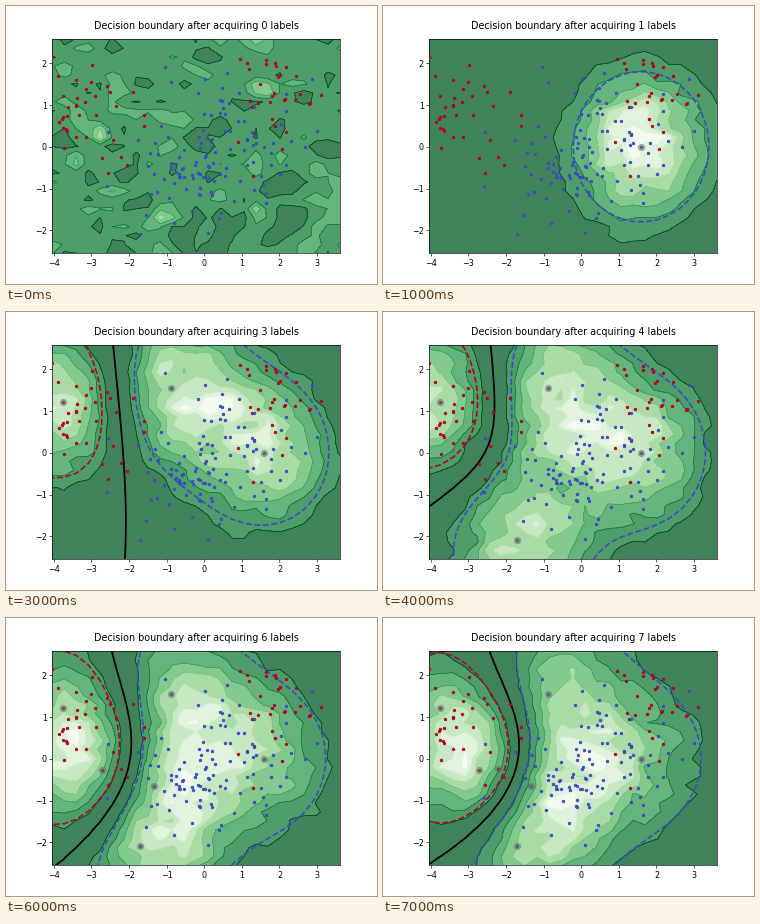
Recreate the animation shown at these times as a matplotlib script. Size 371 by 278 pixels, loop 8000 ms.

```python
import numpy as np
import matplotlib.pyplot as plt
from matplotlib.animation import FuncAnimation

W, H, DPI = 371, 278, 58
RED, BLUE = "#b40426", "#3b4cc0"
XLIM, YLIM = (-4.034, 3.606), (-2.556, 2.575)
GX, GY = np.meshgrid(np.linspace(*XLIM, 25), np.linspace(*YLIM, 25))

# Labelled points in order of acquisition: x, y, class (+1 blue, -1 red)
ACQUIRED = np.array([
    (1.59, 0.0, 1), (-0.89, 1.55, 1), (-3.75, 1.22, -1), (-1.70, -2.09, 1),
    (-2.72, -0.27, -1), (-1.33, -0.65, 1), (-2.21, -0.24, -1),
])

# Gaussian process: kernel length, label noise, and the dashed level,
# which a single label reaches at radius 1.8
LENGTH, NOISE = 1.36, 0.25
EDGE = np.exp(-0.5 * (1.8 / LENGTH) ** 2) / (1 + NOISE)


def kernel(x, y, pts):
    d2 = (x[..., None] - pts[:, 0]) ** 2 + (y[..., None] - pts[:, 1]) ** 2
    return np.exp(-0.5 * d2 / LENGTH**2)


def score(n):
    """Posterior mean on the grid after n labels."""
    pts = ACQUIRED[:n]
    gram = kernel(pts[:, 0], pts[:, 1], pts) + NOISE * np.eye(n)
    return kernel(GX, GY, pts) @ np.linalg.solve(gram, pts[:, 2])


def grain(seed):
    """Unit noise, partly shared between neighbouring nodes."""
    white = np.random.default_rng(seed).normal(size=GX.shape)
    shared = sum(np.roll(white, s, a) for s in (-1, 1) for a in (0, 1)) / 2
    return 0.85 * white + 0.5 * shared


def certainty(n, f):
    """Certainty from 0 to 8 contour levels."""
    if n == 0:
        z = 1.3 * np.exp(0.42 * grain(3))
    else:
        z = np.abs(f) ** 1.5
        z = z / z.max() * (1 + 0.12 * grain(20 + n)) + 0.012 * grain(40 + n)
        z *= 7.8 / z.max()
    return np.clip(z, 0.02, 7.95)


def samples():
    rng = np.random.default_rng(4)

    def cluster(n, center, spread):
        return rng.normal(center, spread, (n, 2))

    red = [cluster(40, (-3.15, 0.85), (0.75, 0.7)), cluster(34, (1.8, 1.15), (0.6, 0.7))]
    blue = [cluster(52, (-0.65, -0.65), (0.65, 0.65)), cluster(60, (0.75, 0.2), (0.8, 1.0))]
    xy, cls = ACQUIRED[:, :2], ACQUIRED[:, 2]
    return {RED: np.vstack(red + [xy[cls < 0]]), BLUE: np.vstack(blue + [xy[cls > 0]])}


SAMPLES = samples()
fig, ax = plt.subplots(figsize=((W + 0.01) / DPI, (H + 0.01) / DPI), dpi=DPI)


def draw(n):
    ax.clear()
    f = score(n) if n else None
    z = certainty(n, f)
    ax.contourf(GX, GY, z, levels=np.arange(9), cmap="Greens_r", alpha=0.75)
    ax.contour(GX, GY, z, levels=np.arange(1, 8), cmap="Greens_r", linewidths=0.8)

    for level, color, style in ((-EDGE, RED, "--"), (0, "black", "-"), (EDGE, BLUE, "--")):
        if n and f.min() < level < f.max():
            ax.contour(GX, GY, f, levels=[level], colors=color, linestyles=style,
                       linewidths=2.2 if style == "-" else 2, zorder=2.5)

    for color, pts in SAMPLES.items():
        ax.scatter(*pts.T, s=10, color=color, linewidths=1, zorder=3)
    ax.scatter(*ACQUIRED[:n, :2].T, s=80, color="dimgray", alpha=0.55, linewidths=0, zorder=4)

    ax.set(xlim=XLIM, ylim=YLIM, xticks=range(-4, 4), yticks=range(-2, 3))
    ax.text(0.5, 1.05, f"Decision boundary after acquiring {n} labels",
            size=12, ha="center", transform=ax.transAxes)
    return []


anim = FuncAnimation(fig, draw, frames=8, interval=1000, init_func=lambda: [], repeat=True)
plt.show()
```
